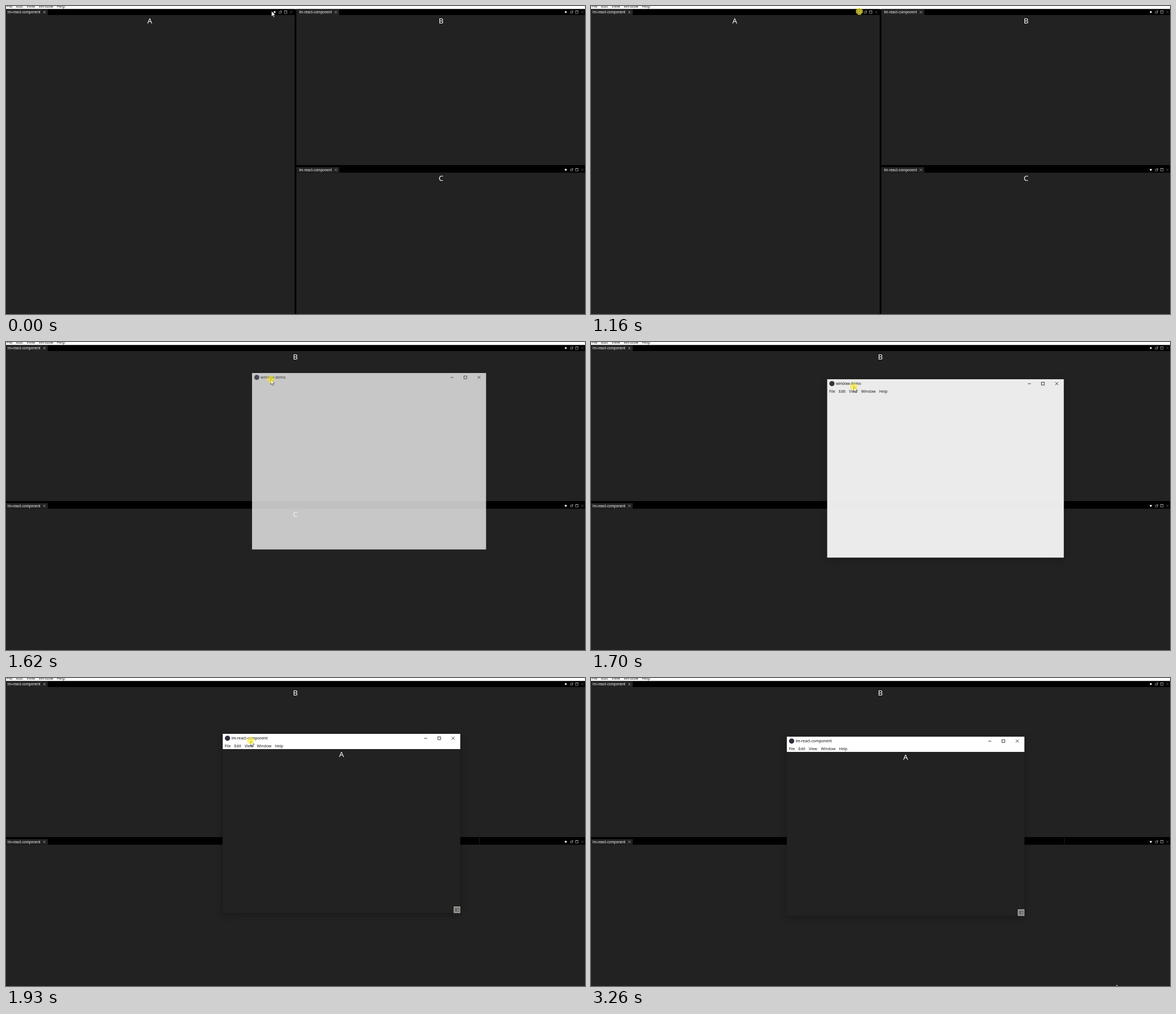
Write an HTML page with a canvas that moves like this. It is 1026 px wide and 546 px high and loops after 3.33 s.

```html
<!DOCTYPE html>
<html>
<head>
<meta charset="utf-8">
<style>
  html, body { margin: 0; width: 100%; height: 100%; overflow: hidden; background: #222; }
  canvas { display: block; }
</style>
</head>
<body>
<canvas id="stage" width="1026" height="546"></canvas>
<script>
const ctx = document.getElementById('stage').getContext('2d');
const LOOP = 3330;
const PANEL = '#222222';
const UI = '"Noto Sans", "Open Sans", sans-serif';
const TAB = '"Liberation Sans", Arial, sans-serif';
const NAME = 'lm-react-component';

// time, x, y, shape, highlighted
const pointer = [
  [0, 470.5, 9, 'arrow'], [380, 473, 7, 'arrow'], [460, 475.5, 9.5, 'move'],
  [1160, 475.5, 9.5, 'move', true], [1390, 474.5, 20, 'move', true],
  [1480, 473, 38, 'arrow', true], [1560, 471.5, 54.5, 'busy', true],
  [1620, 469, 66, 'arrow', true], [1700, 465.5, 79, 'arrow', true],
  [1780, 457, 90, 'arrow', true], [1850, 449, 101, 'arrow', true],
  [1930, 433.5, 111, 'arrow', true], [2010, 420, 112, 'arrow', true],
  [2090, 404, 114, 'arrow', true], [2160, 396.5, 114.5, 'arrow', true],
  [2620, 396.5, 114.5, 'arrow'], [2800, 440, 165, 'arrow'],
  [2870, 640, 330, 'arrow'], [2940, 850, 470, 'arrow'],
  [3010, 945, 527, 'arrow'], [3180, 938, 536, 'arrow'], [3260, 931, 543, 'arrow']
];

// time, x, y, scale, opacity
const popup = [
  [1560, 484, 44, 0.967, 0.38], [1620, 436, 55, 0.985, 0.8],
  [1700, 418.5, 66, 0.996, 0.975], [1780, 410, 79, 1, 1],
  [1850, 400, 91, 1, 1], [1930, 384, 99, 1, 1],
  [2010, 371, 101, 1, 1], [2090, 355, 103, 1, 1], [2160, 347, 104, 1, 1]
];

const stepAt = (steps, t) => steps.filter(s => s[0] <= t).pop();

function rect(x, y, w, h, color) {
  ctx.fillStyle = color;
  ctx.fillRect(x, y, w, h);
}

function box(x, y, w, h, color, width = 0.8) {
  ctx.strokeStyle = color;
  ctx.lineWidth = width;
  ctx.strokeRect(x, y, w, h);
}

function line(color, width, ...points) {
  ctx.strokeStyle = color;
  ctx.lineWidth = width;
  ctx.beginPath();
  for (let i = 0; i < points.length; i += 4) {
    ctx.moveTo(points[i], points[i + 1]);
    ctx.lineTo(points[i + 2], points[i + 3]);
  }
  ctx.stroke();
}

function cross(x, y, r, color, width) {
  line(color, width, x - r, y - r, x + r, y + r, x - r, y + r, x + r, y - r);
}

function disc(x, y, r, color) {
  ctx.fillStyle = color;
  ctx.beginPath();
  ctx.arc(x, y, r, 0, 7);
  ctx.fill();
}

function text(str, x, y, size, family, color, align = 'left') {
  ctx.font = `${size}px ${family}`;
  ctx.textAlign = align;
  ctx.fillStyle = color;
  ctx.fillText(str, x, y);
}

function menu(x, y) {
  const items = { File: 0, Edit: 17, View: 35.5, Window: 57, Help: 89 };
  for (const item in items) text(item, x + items[item], y, 6.8, UI, '#1a1a1a');
}

function stack(letter, x, y, w, h) {
  const right = x + w;
  rect(x, y, w, 10.5, '#000');
  rect(x, y + 0.5, 76, 10, PANEL);
  rect(x, y + 10.5, w, h - 10.5, PANEL);
  text(NAME, x + 5, y + 7.6, 6.5, TAB, '#f4f4f4');
  cross(x + 70, y + 5.5, 2, '#aaa', 0.8);
  disc(right - 35.5, y + 5.2, 1.8, '#eee');
  box(right - 27.5, y + 4.5, 3.5, 3, '#888');
  line('#888', 0.8, right - 26, y + 3, right - 23, y + 3, right - 23, y + 3, right - 23, y + 6);
  box(right - 18.2, y + 3, 4.6, 4.6, '#999');
  line('#999', 1, right - 18.5, y + 3.3, right - 13.3, y + 3.3);
  cross(right - 6, y + 5.3, 2.3, '#555', 0.8);
  text(letter, x + w / 2, y + 25.2, 13.2, UI, '#fff', 'center');
}

function mainWindow(detached) {
  rect(0, 0, 1026, 546, '#000');
  rect(0, 0, 1026, 5.5, '#fff');
  menu(1, 3.2);
  if (!detached) stack('A', -2, 5.5, 513.5, 541);
  const x = detached ? -2 : 514.5;
  const w = 1027.5 - x;
  stack('B', x, 5.5, w, 276.5);
  stack('C', x, 285, w, 261);
}

function popupWindow([, x, y, scale, opacity], t) {
  const w = 421, h = 317.5;
  const loaded = t >= 1850;
  ctx.save();
  ctx.translate(x, y);
  ctx.scale(scale, scale);
  ctx.globalAlpha = opacity;
  if (t >= 1700) {
    ctx.shadowColor = 'rgba(0,0,0,.3)';
    ctx.shadowBlur = 12;
    ctx.shadowOffsetY = 3;
  }
  rect(0, 0, w, h, loaded ? PANEL : '#f0f0f0');
  ctx.shadowColor = 'transparent';
  if (loaded) rect(0, 0, w, 27, '#fff');
  disc(8.5, 7.8, 4.6, '#2b2e3b');
  text(loaded ? NAME : 'window-demo', 15.6, 10.2, 6.7, UI, '#111');
  line('#111', 0.8, w - 64, 8, w - 58.5, 8);
  box(w - 39.8, 5.3, 5, 5, '#111');
  cross(w - 12.6, 7.8, 2.7, '#111', 0.8);
  if (t >= 1700) menu(3.5, 24.3);
  if (loaded) {
    text('A', w / 2, 41.3, 13.2, UI, '#fff', 'center');
    rect(w - 11.5, h - 11.5, 11.5, 11.5, '#8b8b86');
    box(w - 11, h - 11, 10.5, 10.5, '#b0b0ac', 0.8);
    box(w - 8.5, h - 8, 6.5, 5, '#454545', 0.7);
    line('#333', 0.8, w - 8, h - 7, w - 6, h - 5.5, w - 6, h - 5.5, w - 8, h - 4);
  }
  ctx.restore();
}

function arrow(x, y) {
  ctx.beginPath();
  [[0, 0], [0, 9.5], [2.2, 7.5], [3.8, 11], [5.3, 10.3], [3.8, 7], [6.8, 6.8]]
    .forEach(([dx, dy]) => ctx.lineTo(x + dx, y + dy));
  ctx.closePath();
  ctx.fillStyle = '#fff';
  ctx.fill();
  ctx.strokeStyle = '#111';
  ctx.lineWidth = 0.6;
  ctx.stroke();
}

function moveCursor(x, y) {
  const shape = (color, width) => {
    ctx.save();
    ctx.translate(x, y);
    for (let i = 0; i < 4; i++) {
      line(color, width, 0, 0, 0, -4.8, 0, -4.8, -1.7, -3.1, 0, -4.8, 1.7, -3.1);
      ctx.rotate(Math.PI / 2);
    }
    ctx.restore();
  };
  shape('#fff', 2.6);
  shape('#000', 1);
}

function drawPointer([, x, y, shape, highlighted]) {
  if (shape === 'move') moveCursor(x, y);
  else arrow(x, y);
  if (highlighted) disc(x, y, 6.4, 'rgba(255,240,0,.52)');
  if (shape === 'busy') {
    ctx.strokeStyle = '#3f8fc8';
    ctx.lineWidth = 1.7;
    ctx.beginPath();
    ctx.arc(x + 8, y + 0.7, 3, 0, 7);
    ctx.stroke();
  }
}

function draw(now) {
  const t = now % LOOP;
  mainWindow(t >= 1620);
  if (t >= 1780) rect(838.5, 283, 0.8, 12.5, '#2a2a2a');
  const win = stepAt(popup, t);
  if (win) popupWindow(win, t);
  drawPointer(stepAt(pointer, t));
  requestAnimationFrame(draw);
}
requestAnimationFrame(draw);
</script>
</body>
</html>
```
